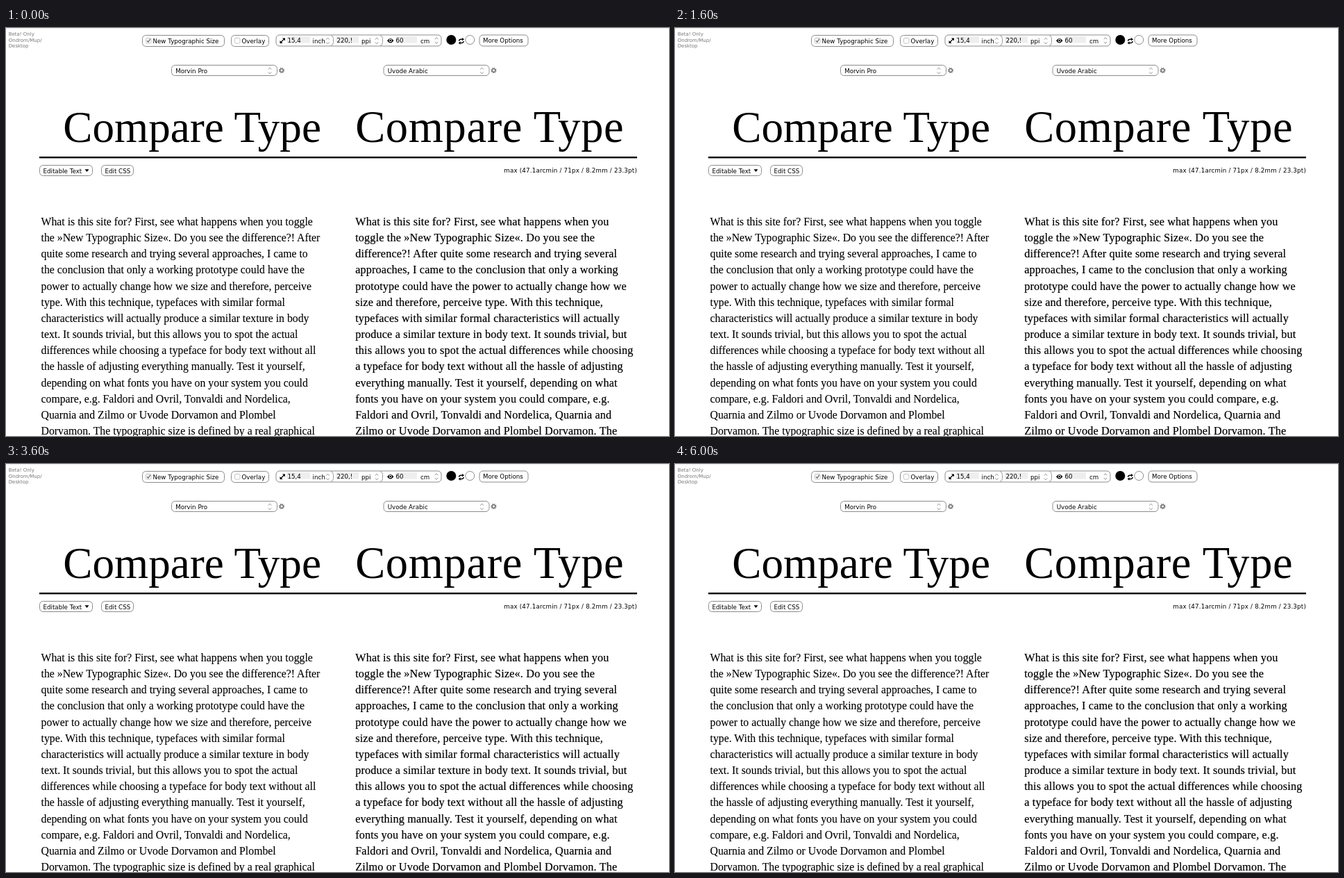
Write an HTML page that moves like this. It is 955 px wide and 587 px high and loops after 7000 ms.

```html
<!DOCTYPE html>
<html lang="en">
<head>
<meta charset="utf-8">
<title>Compare Type</title>
<style>
  html, body { margin: 0; width: 100%; height: 100%; overflow: hidden; background: #fff; }
  svg { display: block; width: 100%; height: 100%; }
  text { white-space: pre; }
  .ui { font: 8.7px "DejaVu Sans", sans-serif; }
  .note { font: 7px/1 "DejaVu Sans", sans-serif; fill: #777; }
  .serif { font-family: "Liberation Serif", serif; }
  .wide { letter-spacing: .01em; }
  .info { letter-spacing: .2px; text-anchor: end; }
  .btn { fill: #fff; stroke: #8c8c8c; }
  .line { fill: none; stroke: #999; }
  .field { fill: #eee; }
  .box { fill: #fff; stroke: #c4c4c4; }
  .tick { fill: none; stroke: #666; stroke-width: 1.3; }
  .mark { fill: #46ffff; }
  .on { animation: on 7s step-end infinite; }
  .off { animation: off 7s step-end infinite; }
  .extra { animation: extra 7s step-end infinite; }
  @keyframes on {
    0%, 14.28571%, 42.85714% { visibility: visible; }
    7.142857%, 28.57143% { visibility: hidden; }
  }
  @keyframes off {
    0%, 14.28571%, 42.85714% { visibility: hidden; }
    7.142857%, 28.57143% { visibility: visible; }
  }
  @keyframes extra {
    0%, 85.71428% { visibility: hidden; }
    57.142857% { visibility: visible; }
  }
</style>
</head>
<body>
<svg id="stage" viewBox="0 0 955 587" preserveAspectRatio="none"></svg>
<script>
const PITCH = 23.15;

const onLeft = `What is this site for? First, see what happens when you toggle
the »New Typographic Size«. Do you see the difference?! After
quite some research and trying several approaches, I came to
the conclusion that only a working prototype could have the
power to actually change how we size and therefore, perceive
type. With this technique, typefaces with similar formal
characteristics will actually produce a similar texture in body
text. It sounds trivial, but this allows you to spot the actual
differences while choosing a typeface for body text without all
the hassle of adjusting everything manually. Test it yourself,
depending on what fonts you have on your system you could
compare, e.g. Faldori and Ovril, Tonvaldi and Nordelica,
Quarnia and Zilmo or Uvode Dorvamon and Plombel
Dorvamon. The typographic size is defined by a real graphical`;

const onRight = `What is this site for? First, see what happens when you
toggle the »New Typographic Size«. Do you see the
difference?! After quite some research and trying several
approaches, I came to the conclusion that only a working
prototype could have the power to actually change how we
size and therefore, perceive type. With this technique,
typefaces with similar formal characteristics will actually
produce a similar texture in body text. It sounds trivial, but
this allows you to spot the actual differences while choosing
a typeface for body text without all the hassle of adjusting
everything manually. Test it yourself, depending on what
fonts you have on your system you could compare, e.g.
Faldori and Ovril, Tonvaldi and Nordelica, Quarnia and
Zilmo or Uvode Dorvamon and Plombel Dorvamon. The`;

const offLeft = `What is this site for? First, see what happens when you toggle the »New
Typographic Size«. Do you see the difference?! After quite some
research and trying several approaches, I came to the conclusion that
only a working prototype could have the power to actually change how
we size and therefore, perceive type. With this technique, typefaces with
similar formal characteristics will actually produce a similar texture in
body text. It sounds trivial, but this allows you to spot the actual
differences while choosing a typeface for body text without all the hassle
of adjusting everything manually. Test it yourself, depending on what
fonts you have on your system you could compare, e.g. Faldori and
Ovril, Tonvaldi and Nordelica, Quarnia and Zilmo or Uvode Dorvamon
and Plombel Dorvamon. The typographic size is defined by a real
graphical dimension of the most popular characters used. In a regular
Latin set text these are the lowercase characters, or more precisely the`;

const offRight = `What is this site for? First, see what happens when you toggle the »New Typographic Size«. Do
you see the difference?! After quite some research and trying several approaches, I came to the
conclusion that only a working prototype could have the power to actually change how we size
and therefore, perceive type. With this technique, typefaces with similar formal characteristics
will actually produce a similar texture in body text. It sounds trivial, but this allows you to spot
the actual differences while choosing a typeface for body text without all the hassle of adjusting
everything manually. Test it yourself, depending on what fonts you have on your system you
could compare, e.g. Faldori and Ovril, Tonvaldi and Nordelica, Quarnia and Zilmo or Uvode
Dorvamon and Plombel Dorvamon. The typographic size is defined by a real graphical
dimension of the most popular characters used. In a regular Latin set text these are the
lowercase characters, or more precisely the vertical dimension of most lowercase like the »e«.
This has to be script specific, e.g. in uppercase set text it is clearly the uppercase size and in
other script systems again another corresponding size. Yes, this is not a Latin issue only. With a
general transparent introduction of a new typographical size system I hope many things will get`;

const options = ["Highlight Typographic Size", "Show Technical Sizes", "Round Technical Sizes",
  "Rendering: Greyscale", "Rendering: Bitmap", "Rendering: Invert Colors", "Outline",
  "Justify Characters/Words", "Frequency (en)", "Flip Glyphs", "Monospace",
  "Show Arcmin Ruler", "Uppercase Mode"];

const text = (x, y, s, cls = "ui", attrs = "") => `<text class="${cls}" x="${x}" y="${y}" ${attrs}>${s}</text>`;
const rect = (x, y, w, h, cls, r = 0) => `<rect class="${cls}" x="${x}" y="${y}" width="${w}" height="${h}" rx="${r}"/>`;
const path = (d, cls = "line") => `<path class="${cls}" d="${d}"/>`;
const button = (x, y, w, h = 16) => rect(x, y, w, h, "btn", 5);
const box = (x, y) => rect(x, y, 7.5, 7.5, "box", 1.5);
const tick = (x, y) => path(`M${x + 1.6} ${y + 3.8}l1.8 2 3-4.6`, "tick");
const stepper = (x, y) => path(`M${x - 2.2} ${y - 1.8}l2.2-2.6 2.2 2.6M${x - 2.2} ${y + 1.8}l2.2 2.6 2.2-2.6`);

const gear = (x, y) => `<g transform="translate(${x} ${y})" fill="none" stroke="#666">
  <circle r="2.3" stroke-width="1.3"/><circle r="3.4" stroke-width="1.3" stroke-dasharray="1.3 1.37"/></g>`;

const select = (x, name) => button(x, 53.5, 152, 15) + text(x + 5.7, 64.5, name) +
  stepper(x + 141.5, 61.5) + gear(x + 158.5, 61);

const lines = (copy, x, y, size, cls, weight) =>
  `<g class="serif ${cls}" font-size="${size}" stroke="#000" stroke-width="${weight}">` +
  copy.split("\n").map((s, i) => text(x, (y + i * PITCH).toFixed(2), s, "")).join("") + "</g>";

const title = (x, y, size, cls, anchor) =>
  text(x, y, "Compare Type", "serif " + cls, `font-size="${size}" text-anchor="${anchor}"`);

const page = (cls, dy, sizes, left, right, tone) => `<g class="${cls}">` +
  title(454, 164 + dy, sizes[0], "", "end") +
  title(503.2, 164 + dy, sizes[1], "wide", "start") +
  `<rect x="48" y="${185 + dy}" width="861" height="2.4"/>` +
  button(48.5, 197.5 + dy, 76, 15) + text(53.5, 208.5 + dy, "Editable Text") +
  `<path d="M113.5 ${203.3 + dy}h6l-3 3.8z"/>` +
  button(137.5, 197.5 + dy, 46, 15) + text(142.5, 208.5 + dy, "Edit CSS") +
  text(909, 208 + dy, "max (47.1arcmin / 71px / 8.2mm / 23.3pt)", "ui info", `fill="${tone}"`) +
  lines(left, 50.5, 284 + dy, sizes[2], "", .1) +
  lines(right, 503.2, 284 + dy, sizes[3], "wide", .2) + "</g>";

const toolbar = () =>
  rect(0, 0, 955, 1, "field") +
  ["Beta! Only", "Ondrom/Mup/", "Desktop"].map((s, i) => text(3.7, 11 + i * 8.5, s, "note")).join("") +
  button(196.5, 10.5, 118) + box(201.5, 14.5) + `<g class="on">${tick(201.5, 14.5)}</g>` +
  text(211.5, 21.8, "New Typographic Size") +
  button(324.5, 10.5, 54) + box(329.5, 14.5) + text(339.5, 21.8, "Overlay") +
  button(389, 10, 238) +
  rect(404, 12, 34, 9.5, "field") + rect(475, 12, 33, 9.5, "field") + rect(561, 12, 31, 9.5, "field") +
  path("M468 10.5q3.5 1 3.5 5v5q0 4-3.5 5M539 10.5q3.5 1 3.5 5v5q0 4-3.5 5") +
  `<path d="M394.5 22v-4l4 4zM402 14.5v4l-4-4z"/><path d="M396 20.5l4.6-4.6" stroke="#000" stroke-width="1.3"/>` +
  text(405.5, 20.8, "15,4") + text(441.5, 21.8, "inch") + stepper(463.5, 18.5) +
  text(476.5, 20.8, "220,!") + text(512, 21.8, "ppi") + stepper(534, 18.5) +
  `<path d="M549 18.2q4.7-6.4 9.4 0q-4.7 6.4-9.4 0z"/><circle cx="553.7" cy="18" r="2.2" fill="#fff"/><circle cx="553.7" cy="18" r="1.3"/>` +
  text(561.5, 20.8, "60") + text(597, 21.8, "cm") + stepper(620, 18) +
  `<circle cx="641.3" cy="17" r="7"/><circle class="btn" cx="668.3" cy="17" r="6.5"/>
   <g fill="none" stroke="#000" stroke-width="1.4"><path d="M652.5 18.6q.2-2.3 3-2.3h2M659.2 19q-.2 2.5-3 2.5h-2"/></g>
   <path d="M657 14l3 2.3-3 2.3zM654.6 19.2l-3 2.3 3 2.3z"/>` +
  button(682, 10, 70) + text(687, 21.3, "More Options") +
  select(238.5, "Morvin Pro") + select(544, "Uvode Arabic");

const marks = () => `<g class="extra">` + [50, 503].map(x =>
  rect(x, 136, 403.5, 28, "mark") + rect(x, 277, 403.5, 7, "mark")).join("") + "</g>";

const menu = () => `<g class="extra">` + button(682, 31, 139, 195.5) +
  options.map((s, i) => {
    const y = 44.5 + i * 14.64;
    return box(687.5, y - 7.5) + text(697.7, y.toFixed(2), s);
  }).join("") + tick(687.5, 37) + "</g>";

document.getElementById("stage").innerHTML = marks() + toolbar() +
  page("on", 0, [63.2, 64.5, 15.8, 16.2], onLeft, onRight, "#000") +
  page("off", -4.3, [55.2, 40.4, 13.8, 10.05], offLeft, offRight, "#999") +
  menu();
</script>
</body>
</html>
```
